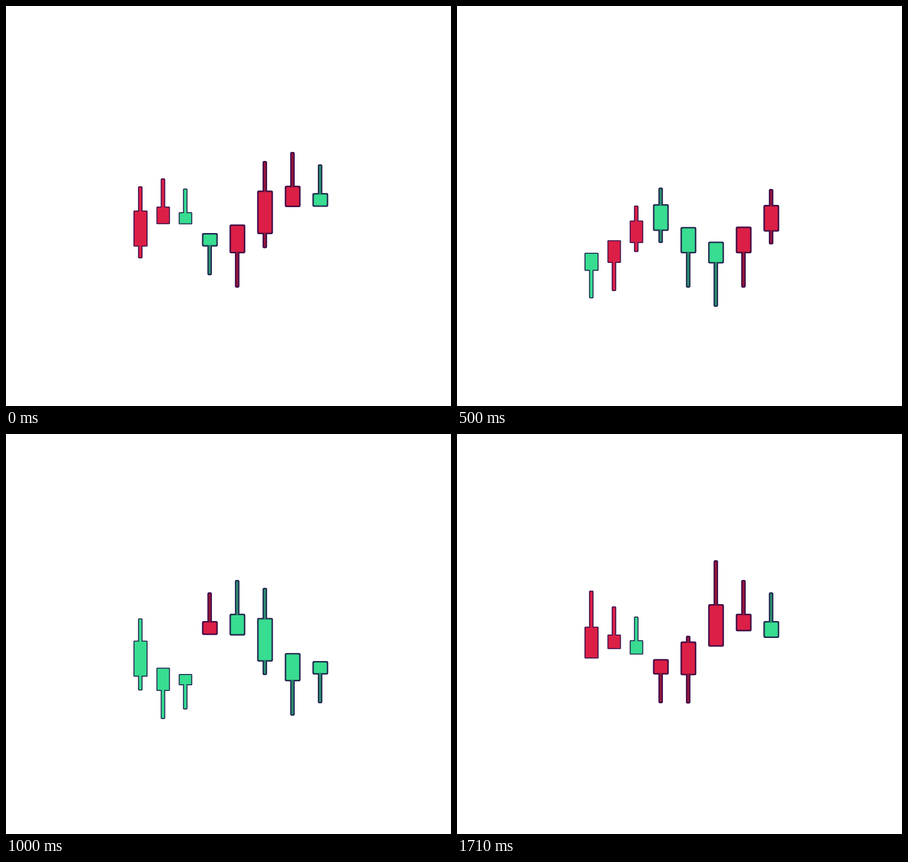
Animation of 789 by 710 pixels, one loop 1750 ms. Source, as an HTML page with a canvas:

```html
<!DOCTYPE html>
<html lang="en">
<head>
<meta charset="utf-8">
<title>Candlesticks</title>
<style>
  html, body { margin: 0; width: 100%; height: 100%; overflow: hidden; background: #fff; }
  canvas { display: block; }
</style>
</head>
<body>
<canvas id="stage" width="789" height="710"></canvas>
<script>
const ctx = document.getElementById("stage").getContext("2d");
const LOOP = 1750;
const BEAT = 250;
const BEAT_STEPS = [0, 80, 130, 210];

// Layers run from the outline inwards: [inset, colour, drawn on the wick too].
const THIN = {
  radius: 1.5,
  tip: 2,
  red: [[0, "#35104f", true], [1.3, "#8c1848", true], [2, "#dc1f46", true]],
  green: [[0, "#22204f", true], [1.3, "#2b7d70", true], [2, "#38dd91", true]]
};
const THICK = {
  radius: 3,
  tip: 3,
  red: [[0, "#35094b", true], [1.6, "#5c0f42", true], [2.3, "#951539", true], [3, "#dc1f46", false]],
  green: [[0, "#1e1b4b", true], [1.6, "#24505c", true], [2.3, "#2c8d70", true], [3, "#38dd91", false]]
};

// phase and half are measured in half cycles and milliseconds per half cycle.
const candle = (style, x, width, top, span, wickTop, wickSpan, phase, half = 906, floor = 710) =>
  ({ style, x, width, top, span, wickTop, wickSpan, phase, half, floor });

const candles = [
  candle(THIN, 238.5, 25, 342, 128, 278, 256, 0.45, 923, 519),
  candle(THIN, 278.7, 24, 356, 100, 306, 200, 0.176),
  candle(THIN, 318.2, 24, 366, 80, 324, 165, -0.099, 893),
  candle(THICK, 361.5, 28, 332, 95, 281, 197, 0.972),
  candle(THICK, 410.3, 28, 319, 120, 259, 241, 0.708),
  candle(THICK, 459.3, 28, 302, 155, 224, 310, 0.45),
  candle(THICK, 508.3, 28, 319, 120, 259, 241, 0.182),
  candle(THICK, 557.3, 28, 332, 95, 281, 197, -0.068)
];

// Cubic ease-in-out with control points (.42, 0) and (.58, 1).
function ease(p) {
  let low = 0, high = 1;
  for (let i = 0; i < 24; i++) {
    const t = (low + high) / 2, u = 1 - t;
    const x = 3 * u * u * t * 0.42 + 3 * u * t * t * 0.58 + t * t * t;
    if (x < p) low = t; else high = t;
  }
  return low * low * (3 - 2 * low);
}

const isFalling = p => Math.floor(p) % 2 === 0;

function box(left, top, right, bottom, inset, radius) {
  const w = right - left - 2 * inset, h = bottom - top - 2 * inset;
  if (w <= 0 || h <= 0) return;
  ctx.beginPath();
  ctx.roundRect(left + inset, top + inset, w, h, Math.max(0.5, radius - inset / 2));
  ctx.fill();
}

function drawCandle(c, time) {
  const p = c.phase + time / c.half;
  const travel = ease(p - Math.floor(p));
  const centre = isFalling(p) ? travel : 1 - travel;
  const from = Math.max(0, centre - 0.25);
  const to = Math.min(1, centre + 0.25);

  const top = c.top + from * c.span;
  const bottom = c.top + to * c.span;
  // The wick always reaches into the body so that both form one outline.
  const wickTop = Math.min(c.wickTop + from * c.wickSpan, bottom - 7);
  const wickBottom = Math.max(Math.min(c.floor, c.wickTop + to * c.wickSpan), top + 7);
  const wickX = c.x - 0.4;

  // The colour turns just before the direction does.
  const layers = isFalling(p + 0.03) ? c.style.red : c.style.green;
  for (const [inset, color, onWick] of layers) {
    ctx.fillStyle = color;
    box(c.x - c.width / 2, top, c.x + c.width / 2, bottom, inset, c.style.radius);
    if (onWick) {
      const end = Math.max(wickBottom, top + 7);
      box(wickX - 4, wickTop, wickX + 4, Math.max(end, wickTop + 8) > bottom ? end : Math.min(end, bottom), inset, c.style.tip);
    }
  }
}

function stepTime(time) {
  const beat = Math.floor(time / BEAT) * BEAT;
  return beat + BEAT_STEPS.filter(step => step <= time - beat).pop();
}

const start = performance.now();

function draw() {
  const time = stepTime(Math.max(0, performance.now() - start) % LOOP);
  ctx.fillStyle = "#fff";
  ctx.fillRect(0, 0, 789, 710);
  for (const c of candles) drawCandle(c, time);
  requestAnimationFrame(draw);
}

draw();
</script>
</body>
</html>
```
